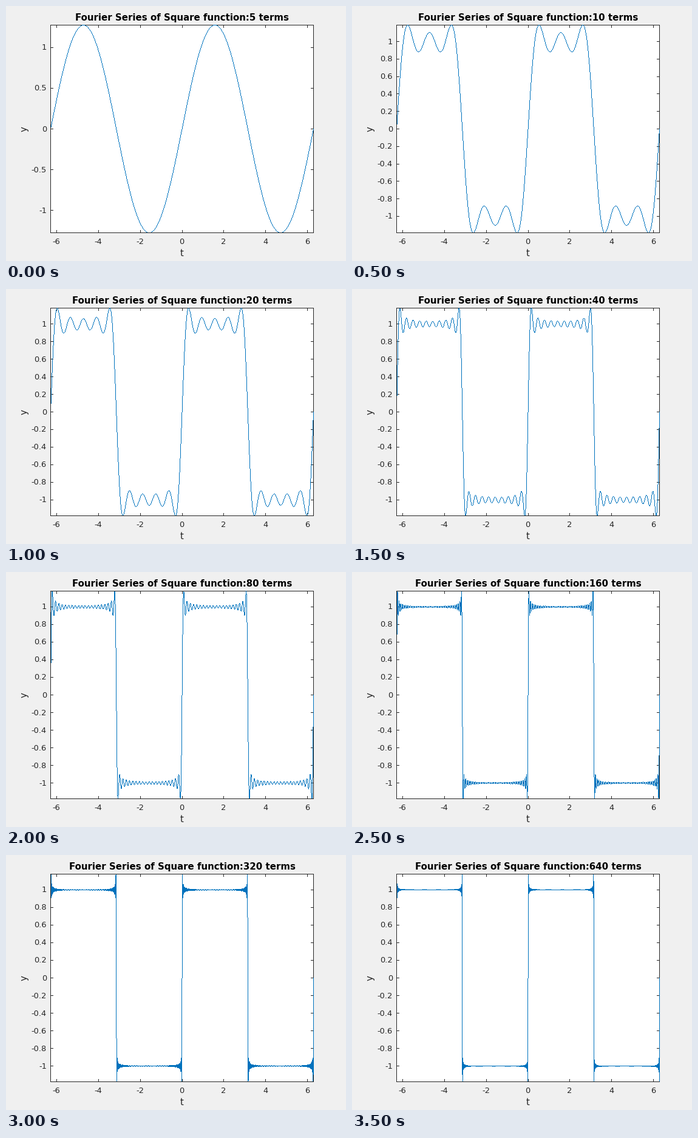
These frames come from a looping animation (560x420 px, 4 s). A matplotlib script:

```python
import numpy as np
import matplotlib.pyplot as plt
from matplotlib.animation import FuncAnimation
from matplotlib.colors import to_rgba

W, H, DPI = 560, 420, 80
PT = 72 / DPI  # points per pixel
LEFT, RIGHT, TOP, BOTTOM = 73.5, 506.5, 31.5, 373.5
MID_X, MID_Y = (LEFT + RIGHT) / 2, (TOP + BOTTOM) / 2
SCALE_X = (RIGHT - LEFT) / (4 * np.pi)
TICK = 4
INK, BLUE, GREY = "#262626", "#0072bd", "#f0f0f0"
TERMS = [5 * 2**k for k in range(8)]

plt.rcParams["font.family"] = "DejaVu Sans"

fig = plt.figure(figsize=(W / DPI, H / DPI), dpi=DPI, facecolor=GREY)
ax = fig.add_axes([0, 0, 1, 1])


def series(t, terms):
    """Partial sum of the odd harmonics up to terms / 2."""
    y = np.zeros_like(t)
    for n in range(1, terms // 2 + 1, 2):
        y += 4 / np.pi * np.sin(n * t) / n
    return y


T = np.linspace(-2 * np.pi, 2 * np.pi, 12001)
FINE = np.linspace(-2 * np.pi, 2 * np.pi, 800001)
CURVES = [series(T, n) for n in TERMS]


def thin_line(x, y):
    """Hard one-pixel line: a pixel wherever a row or column centre is crossed."""
    crossed = (np.diff(np.floor(x - 0.5)) != 0) | (np.diff(np.floor(y - 0.5)) != 0)
    cols = np.clip(x[1:][crossed].astype(int), int(LEFT), int(RIGHT))
    rows = np.clip(y[1:][crossed].astype(int), int(TOP), int(BOTTOM))
    image = np.zeros((H, W, 4))
    image[rows, cols] = to_rgba(BLUE)
    ax.imshow(image, extent=[0, W, H, 0], aspect="auto",
              interpolation="nearest", zorder=2)


def stroke(xs, ys, z=1):
    ax.plot(xs, ys, color=INK, lw=PT, antialiased=False, snap=False, zorder=z,
            solid_capstyle="projecting", solid_joinstyle="miter")


def label(x, y, text, px=13, **kw):
    kw = {"ha": "center", "va": "baseline", "color": INK, **kw}
    ax.text(x, y, text, fontsize=px * PT, **kw)


def pixel(v):
    return np.floor(v) + 0.5


def draw(i):
    ax.clear()
    ax.axis("off")

    peak = CURVES[i].max()
    scale_y = (BOTTOM - TOP) / 2 / peak
    ax.fill([LEFT, RIGHT, RIGHT, LEFT], [TOP, TOP, BOTTOM, BOTTOM],
            color="white", lw=0, antialiased=False, snap=False, zorder=0)

    # The curve covers the top and right edges, not the left and bottom ones.
    stroke([LEFT, RIGHT, RIGHT], [TOP, TOP, BOTTOM])
    thin_line(MID_X + FINE * SCALE_X,
              MID_Y - np.interp(FINE, T, CURVES[i]) * scale_y)
    stroke([LEFT, LEFT, RIGHT], [TOP, BOTTOM, BOTTOM], z=3)

    for v in range(-6, 7, 2):
        x = MID_X + v * SCALE_X
        px = pixel(x)
        stroke([px, px], [BOTTOM, BOTTOM - TICK])
        stroke([px, px], [TOP, TOP + TICK])
        label(x - 0.5, 392, f"{v}")

    step = 0.5 if i == 0 else 0.2
    count = round(1 / step)
    for k in range(-count, count + 1):
        y = MID_Y - k * step * scale_y
        py = pixel(y)
        stroke([LEFT, LEFT + TICK], [py, py])
        stroke([RIGHT, RIGHT - TICK], [py, py])
        label(67, np.floor(y + 4.5), f"{k * step:g}", ha="right")

    label(MID_X, 24, f"Fourier Series of Square function:{TERMS[i]} terms",
          15, weight="bold", color="black")
    label(MID_X - 0.5, 412, "t", 15)
    label(34, MID_Y, "y", 15, rotation=90, rotation_mode="anchor")
    ax.set_xlim(0, W)
    ax.set_ylim(H, 0)
    return []


anim = FuncAnimation(fig, draw, frames=len(TERMS), interval=500,
                     init_func=lambda: [], repeat=True, repeat_delay=0)
plt.show()
```
